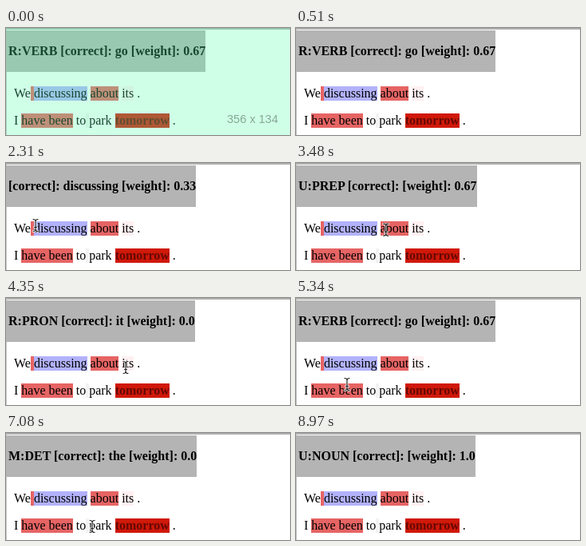
An HTML page for the animation above (9.03 s loop, 356 by 134 pixels).

```html
<!DOCTYPE html>
<html lang="en">
<head>
<meta charset="utf-8">
<title>Grammar corrections on hover</title>
<style>
  html, body { margin: 0; width: 100%; height: 100%; overflow: hidden; background: #fff; }
  #stage { position: relative; width: 356px; height: 134px; overflow: hidden;
    font: 16px/18px "Liberation Serif", serif; color: #000; }
  #stage > * { position: absolute; white-space: pre; }
  #header { left: 0; top: 3px; padding-left: 3px; height: 52px; line-height: 52px;
    font-weight: bold; background: #b4b4b4; }
  .edge { left: 0; top: 0; width: 356px; height: 134px; box-sizing: border-box;
    border-top: 2px solid #b0b0b0; border-left: 1px solid #c4c4c4; }
  .line { left: 10px; }
  .line span { display: inline-block; height: 18px; }
  .same { background: #b2b2fc; }
  .high { background: #e66464; }
  .full { background: #d01808; color: #650800; font-weight: bold; }
  .low { background: #fff0f2; }
  .none { background: #f2f2f2; }
  #overlay { inset: 0; background: rgba(87, 255, 173, .28); }
  #overlay span { position: absolute; left: 277px; top: 105px;
    font: 14.6px/18px "Liberation Sans", sans-serif; color: #86a896; }
  #cursor { left: 0; top: 0; overflow: visible; }
</style>
</head>
<body>
<div id="stage">
  <div class="edge"></div>
  <div id="header"></div>
  <div class="line" style="top:73px">We<span class="high"> </span><span class="same">discussing</span> <span class="high">about</span> <span class="low">its</span> .</div>
  <div class="line" style="top:107px">I <span class="high">have been</span> to<span class="none"> </span>park <span class="full">tomorrow</span> .</div>
  <svg id="cursor" width="1" height="1">
    <path id="arrow" d="M0 0V15.5L3.6 12.2 6 17.6 8.6 16.5 6.3 11.2H11Z"
      fill="#000" stroke="#fff" stroke-width="1.2"/>
    <g id="beam" fill="none" stroke-linecap="round">
      <path id="beamShape" d="M-3 -7.5Q0 -7.5 0 -5Q0 -7.5 3 -7.5M0 -5V5M-3 7.5Q0 7.5 0 5Q0 7.5 3 7.5M-1.5 2.5H1.5"
        stroke="#fff" stroke-width="2.6" stroke-opacity=".7"/>
      <use href="#beamShape"/>
      <path d="M-3 -7.5Q0 -7.5 0 -5Q0 -7.5 3 -7.5M0 -5V5M-3 7.5Q0 7.5 0 5Q0 7.5 3 7.5M-1.5 2.5H1.5"
        stroke="#222" stroke-width="1.2"/>
    </g>
  </svg>
  <div id="overlay"><span>356 x 134</span></div>
</div>
<script>
  const LOOP = 9030, FADE_START = 15, FADE_END = 510;

  // Start time, error type, correction, weight
  const corrections = [
    [0, 'R:VERB', 'go', '0.67'],
    [1740, 'M:VERB', 'have been', '0.67'],
    [2190, '', 'discussing', '0.33'],
    [3390, 'U:PREP', '', '0.67'],
    [3990, 'R:PRON', 'it', '0.0'],
    [4920, 'R:VERB', 'go', '0.67'],
    [6540, 'M:DET', 'the', '0.0'],
    [7260, 'U:NOUN', '', '1.0']
  ];

  // Pointer stops: time, x, y
  const path = [
    [780, 366, 78], [1080, 220, 56], [1380, 117, 44], [1590, 54, 62],
    [1740, 34, 76], [1890, 33, 79], [2070, 33, 79], [2310, 37, 78],
    [2790, 78, 81], [3060, 78, 81], [3390, 106, 83], [3960, 144, 87],
    [4350, 150, 87], [4560, 141, 92], [4905, 82, 107], [5340, 64, 108],
    [5550, 60, 110], [5850, 60, 110], [6540, 101, 117], [6720, 104, 118],
    [6870, 104, 118], [7080, 108, 117], [7260, 137, 116], [7590, 186, 115],
    [7800, 186, 115], [7860, 188, 115], [8250, 188, 115], [8730, 184, 146],
    [LOOP, 184, 146]
  ];

  const byId = id => document.getElementById(id);
  const [header, overlay, cursor, arrow, beam] =
    ['header', 'overlay', 'cursor', 'arrow', 'beam'].map(byId);

  // Slope at a stop; zero where the pointer rests or turns round
  function slope(i, axis) {
    const a = path[i - 1], b = path[i], c = path[i + 1];
    if (!a || !c || (b[axis] - a[axis]) * (c[axis] - b[axis]) <= 0) return 0;
    return (c[axis] - a[axis]) / (c[0] - a[0]);
  }

  function pointerAt(time) {
    const next = path.findIndex(stop => stop[0] > time);
    if (next < 1) return [path[0][1], path[0][2]];
    const i = next - 1, span = path[next][0] - path[i][0];
    const u = (time - path[i][0]) / span, v = 1 - u;
    return [1, 2].map(axis =>
      v * v * (1 + 2 * u) * path[i][axis] + u * u * (3 - 2 * u) * path[next][axis] +
      span * u * v * (v * slope(i, axis) - u * slope(next, axis)));
  }

  const overText = (x, y) => x > 8 && x < 212 && ((y > 72 && y < 92) || (y > 106 && y < 126));

  function draw(time) {
    const [, type, fix, weight] = corrections.filter(c => c[0] <= time).pop();
    const label = [type, '[correct]:', fix, '[weight]:', weight].filter(Boolean).join(' ');
    if (header.textContent !== label) header.textContent = label;

    const [x, y] = pointerAt(time);
    const isBeam = overText(x, y);
    cursor.style.transform = `translate(${x}px, ${y}px)`;
    arrow.style.display = isBeam ? 'none' : '';
    beam.style.display = isBeam ? '' : 'none';

    const fade = (time - FADE_START) / (FADE_END - FADE_START);
    overlay.style.opacity = 1 - Math.min(1, Math.max(0, fade));
  }

  const start = performance.now();
  function tick() {
    draw((performance.now() - start) % LOOP);
    requestAnimationFrame(tick);
  }
  tick();
</script>
</body>
</html>
```
